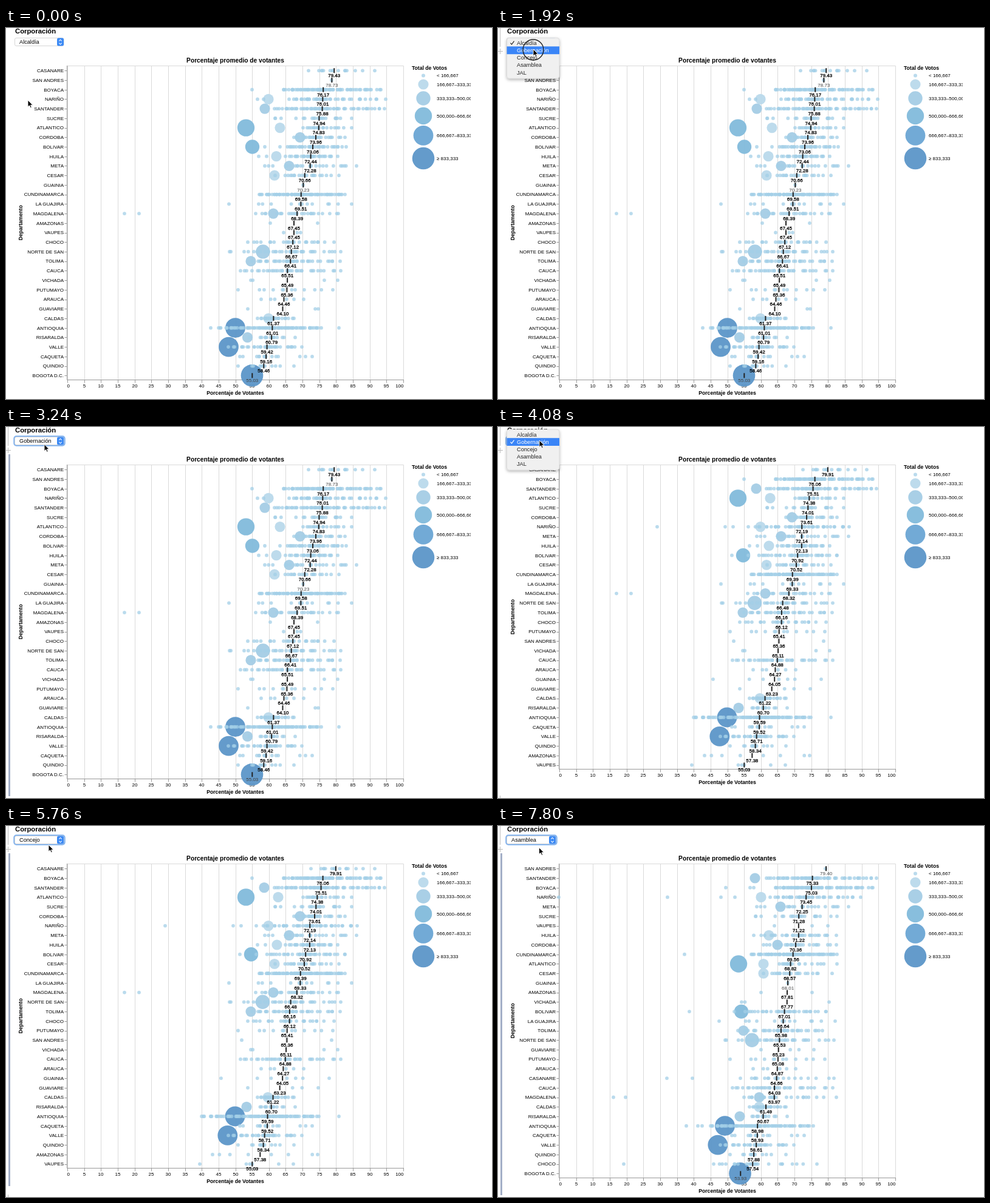
An HTML page that plays this animation: 800 px wide and 612 px high, repeating every 8000 ms.

```html
<!DOCTYPE html>
<html lang="es">
<head>
<meta charset="utf-8">
<title>Porcentaje promedio de votantes</title>
<style>
html, body { margin: 0; width: 100%; height: 100%; overflow: hidden; background: #fff; }
svg { display: block; width: 800px; height: 612px; font: 8px "Liberation Sans", Arial, sans-serif; fill: #000; }
.b { font-weight: bold; font-size: 8.6px; }
.m { text-anchor: middle; }
.e { text-anchor: end; }
.ui { font-size: 9.2px; }
.heavy { stroke: #000; stroke-width: .3px; }
</style>
</head>
<body>
<svg id="stage" viewBox="0 0 800 612"></svg>
<script>
const LOOP = 8000, STEP = 120;
const X0 = 101, UNIT = 5.53, TOP = 62.4, ROW = 15.72;
const COLORS = ['#a3cfe7', '#b9d9eb', '#a4cce5', '#82badb', '#6ba6d4', '#5c96c9'];
const OPTIONS = ['Alcaldía', 'Gobernación', 'Concejo', 'Asamblea', 'JAL'];

// Mean turnout per department for the three views
const MEANS = {
  'CASANARE': [79.43, 79.91, 64.66], 'SAN ANDRES': [78.73, 65.36, 79.40],
  'BOYACA': [76.17, 76.06, 75.03], 'NARIÑO': [76.01, 72.19, 73.45],
  'SANTANDER': [75.88, 75.51, 75.33], 'SUCRE': [74.94, 74.01, 71.28],
  'ATLANTICO': [74.83, 74.38, 68.82], 'CORDOBA': [73.96, 73.61, 70.36],
  'BOLIVAR': [73.06, 70.92, 67.01], 'HUILA': [72.44, 72.13, 71.22],
  'META': [72.28, 72.14, 72.25], 'CESAR': [70.66, 70.52, 68.57],
  'GUAINIA': [70.23, 64.05, 68.01], 'CUNDINAMARCA': [69.58, 69.39, 69.56],
  'LA GUAJIRA': [69.51, 69.33, 66.64], 'MAGDALENA': [68.39, 68.32, 63.97],
  'AMAZONAS': [67.45, 57.38, 67.81], 'VAUPES': [67.45, 55.03, 71.221],
  'CHOCO': [67.12, 66.12, 57.54], 'NORTE DE SAN': [66.67, 66.48, 65.53],
  'TOLIMA': [66.41, 66.16, 65.98], 'CAUCA': [65.51, 64.88, 64.03],
  'VICHADA': [65.49, 65.11, 67.77], 'PUTUMAYO': [65.36, 65.41, 65.08],
  'ARAUCA': [64.46, 64.27, 64.87], 'GUAVIARE': [64.10, 63.23, 65.23],
  'CALDAS': [61.37, 61.22, 61.49], 'ANTIOQUIA': [61.01, 59.59, 58.98],
  'RISARALDA': [60.79, 60.70, 60.67], 'VALLE': [59.42, 58.71, 58.61],
  'CAQUETA': [59.16, 59.52, 58.93], 'QUINDIO': [58.46, 58.34, 57.88],
  'BOGOTA D.C.': [55.03, 0, 53.93]
};

// Town dots: left edge, right edge, count; later views only list differences
const SPREAD = [{
  'CASANARE': [498, 607, 15], 'SAN ANDRES': [536, 536, 1], 'BOYACA': [457, 617, 72],
  'NARIÑO': [466, 625, 42], 'SANTANDER': [442, 623, 62], 'SUCRE': [443, 569, 21],
  'ATLANTICO': [489, 569, 20], 'CORDOBA': [474, 558, 26], 'BOLIVAR': [451, 560, 34],
  'HUILA': [460, 546, 30], 'META': [426, 577, 25], 'CESAR': [443, 548, 21],
  'GUAINIA': [489, 489, 1], 'CUNDINAMARCA': [417, 558, 85], 'LA GUAJIRA': [367, 569, 14],
  'MAGDALENA': [411, 547, 26], 'AMAZONAS': [435, 513, 2], 'VAUPES': [457, 485, 3],
  'CHOCO': [398, 540, 26], 'NORTE DE SAN': [368, 551, 34], 'TOLIMA': [405, 550, 37],
  'CAUCA': [386, 551, 36], 'VICHADA': [403, 546, 4], 'PUTUMAYO': [382, 538, 12],
  'ARAUCA': [420, 490, 6], 'GUAVIARE': [398, 514, 3], 'CALDAS': [414, 474, 23],
  'ANTIOQUIA': [350, 519, 82], 'RISARALDA': [400, 476, 14], 'VALLE': [366, 487, 34],
  'CAQUETA': [385, 504, 15], 'QUINDIO': [382, 474, 12]
}, {
  'CASANARE': [502, 607, 15], 'SAN ANDRES': [388, 536, 2], 'NARIÑO': [412, 578, 45],
  'BOLIVAR': [412, 558, 36], 'GUAINIA': [354, 532, 7], 'AMAZONAS': [340, 513, 8],
  'VAUPES': [319, 473, 6], 'GUAVIARE': [398, 514, 4], 'ANTIOQUIA': [322, 515, 84]
}, {
  'CASANARE': [399, 553, 20], 'SAN ANDRES': [539, 539, 1], 'NARIÑO': [448, 597, 42],
  'SUCRE': [424, 558, 22], 'ATLANTICO': [463, 558, 19], 'CORDOBA': [437, 557, 26],
  'BOLIVAR': [389, 540, 36], 'HUILA': [421, 557, 30], 'CESAR': [437, 550, 22],
  'GUAINIA': [477, 477, 1], 'LA GUAJIRA': [364, 555, 14], 'MAGDALENA': [405, 557, 24],
  'AMAZONAS': [433, 517, 2], 'VAUPES': [455, 543, 3], 'VICHADA': [401, 545, 3],
  'TOLIMA': [395, 534, 36], 'NORTE DE SAN': [374, 553, 33], 'CHOCO': [355, 525, 24],
  'GUAVIARE': [433, 520, 4], 'ANTIOQUIA': [350, 519, 82]
}];

const STRAY = [
  { 'BOYACA': [405], 'NARIÑO': [414, 424], 'BOLIVAR': [426], 'HUILA': [416, 429], 'MAGDALENA': [195, 219], 'ANTIOQUIA': [337, 548] },
  { 'BOYACA': [405], 'NARIÑO': [262, 374, 387], 'BOLIVAR': [385], 'HUILA': [414, 427], 'MAGDALENA': [195, 219], 'ANTIOQUIA': [548] },
  { 'CASANARE': [278, 320], 'BOYACA': [375, 415, 421], 'NARIÑO': [100, 279, 367, 390], 'BOLIVAR': [315],
    'CUNDINAMARCA': [307], 'MAGDALENA': [190, 210], 'CHOCO': [207], 'ANTIOQUIA': [310, 329, 336] }
];

// Cities: department, radius, colour, x in each view
const CITIES = [
  ['NARIÑO', 8.6, 1, 432, 432, 433], ['SANTANDER', 8.6, 2, 426, 425, 423],
  ['ATLANTICO', 14.2, 3, 395, 395, 396], ['ATLANTICO', 8.6, 1, 451, 448, 437],
  ['CORDOBA', 8.6, 2, 484, 484, 460], ['BOLIVAR', 11.7, 3, 405.5, 403.5, 400.5],
  ['HUILA', 8.6, 1, 445, 446, 446], ['META', 8.6, 2, 466, 466, 465],
  ['CESAR', 8.6, 1, 442, 442, 437], ['MAGDALENA', 8.6, 2, 440, 440, 430],
  ['NORTE DE SAN', 11.7, 2, 423, 422.5, 418], ['TOLIMA', 8.6, 2, 403, 403, 404],
  ['CALDAS', 8.6, 1, 432, 431, 430], ['ANTIOQUIA', 16.4, 5, 377.5, 377, 373.5],
  ['RISARALDA', 8.6, 2, 397.5, 396, 398], ['VALLE', 16.4, 5, 366.5, 364.8, 361.8],
  ['BOGOTA D.C.', 18.3, 5, 405, 0, 398.5]
];

const LEGEND = [['< 166,667', 78.5, 3], ['166,667–333,333', 93, 8.6], ['333,333–500,000', 116, 11.7],
  ['500,000–666,667', 145, 14.2], ['666,667–833,333', 177.3, 16.4], ['≥ 833,333', 215, 18.3]];

// Pointer: time, x, y
const PATH = [[0, 36, 119], [120, 36, 119], [240, 40, 100], [480, 40, 100], [960, 54, 21], [1560, 54, 21],
  [1920, 58, 35], [2760, 60, 35], [3000, 60, 35], [3480, 66, 22], [4080, 68, 22], [4440, 70, 35],
  [4800, 70, 31], [5760, 70, 31], [6120, 69, 23], [6480, 69, 23], [6840, 68.5, 33.5], [7800, 67.5, 35.5]];
const OPEN = [[1320, 2160], [3720, 4800], [6360, 7200]];
const CLICKS = [960, 1920, 3480, 4560, 6120, 6960];
const SWAPS = [3360, 6840];

const px = v => X0 + v * UNIT;
const during = (t, [a, b]) => t >= a && t < b;
const text = (x, y, s, cls = '', more = '') => `<text x="${x}" y="${y}" class="${cls}" ${more}>${s}</text>`;
const rect = (x, y, w, h, fill, more = '') => `<rect x="${x}" y="${y}" width="${w}" height="${h}" fill="${fill}" ${more}/>`;
const dot = (x, y, r, c, o) => `<circle cx="${x.toFixed(1)}" cy="${y.toFixed(1)}" r="${r}" fill="${COLORS[c]}" fill-opacity="${o}"/>`;
const path = (d, stroke, w = 1) => `<path d="${d}" fill="none" stroke="${stroke}" stroke-width="${w}"/>`;

function random(seed) {
  return () => (seed = (seed * 16807) % 2147483647) / 2147483647;
}

// Dots crowd around the mean and reach both edges
function towns(name, view, mean, seed) {
  const [lo, hi, n] = SPREAD[view][name] || SPREAD[0][name] || [0, 0, 0];
  const rnd = random(seed * 7919 + 77), mid = Math.min(hi, Math.max(lo, px(mean)));
  const xs = [...(STRAY[view][name] || [])];
  for (let i = 0; i < n; i++) {
    const u = 2 * (i + 3 * rnd() - 1) / n - 1;
    const t = i === 0 ? -1 : i === n - 1 ? 1 : Math.max(-1, Math.min(1, u));
    xs.push(mid + (t < 0 ? lo - mid : hi - mid) * Math.abs(t) ** 1.4);
  }
  return xs;
}

function chart(view) {
  const names = Object.keys(MEANS);
  const rows = names.filter(n => MEANS[n][view]).sort((a, b) => MEANS[b][view] - MEANS[a][view]);
  const bottom = Math.round(TOP + rows.length * ROW) - .5;
  let grid = '', ticks = '', axis = '', small = '', big = '', marks = '';
  for (let v = 0; v <= 100; v += 5) {
    const x = Math.round(px(v)) + .5;
    grid += `M${x} 62.5V${bottom}`;
    ticks += `M${x} ${bottom}v5`;
    axis += text(v === 100 ? 654.5 : v ? x - .5 : 100.5, bottom + 12.3, v, v === 100 ? 'e' : v ? 'm' : '');
  }
  rows.forEach((name, i) => {
    const y = TOP + (i + .5) * ROW, mean = MEANS[name][view], x = px(mean);
    const dots = towns(name, view, mean, names.indexOf(name) + 1);
    ticks += `M96.5 ${Math.round(y)}.5h4`;
    axis += text(95, y + 2.8, name, 'e');
    for (const c of CITIES) if (c[0] === name) big += dot(c[3 + view], y, c[1], c[2], .95);
    for (const tx of dots) small += dot(tx, y, 2.9, 0, .75);
    marks += rect(x - 1, y - 4, 2, 8, '#222') +
      text(x, y + 10.8, mean.toFixed(2), dots.length > 1 ? 'm heavy' : 'm', dots.length > 1 ? '' : 'fill="#444"');
  });
  const mid = (62 + bottom) / 2;
  return `<g class="chart">${path(grid + 'M101 62.5H654.5', '#dadada')}${path(ticks + `M100.5 62V${bottom}H655`, '#999')}` +
    axis + text(377.5, bottom + 24.2, 'Porcentaje de Votantes', 'b m') +
    text(0, 0, 'Departamento', 'b m', `transform="translate(27 ${mid}) rotate(-90)"`) +
    big + small + marks + '</g>';
}

function legend() {
  let s = text(668, 69, 'Total de Votos', 'b');
  LEGEND.forEach(([label, y, r], i) => {
    s += dot(687, y, r, i, i ? .95 : .75) + text(709, y + 2.6, label);
  });
  return `<g clip-path="url(#cut)">${s}</g>`;
}

const stage = document.getElementById('stage');
stage.innerHTML = `<defs><clipPath id="cut"><rect x="660" y="55" width="105" height="190"/></clipPath>
  <filter id="soft" x="-20%" y="-20%" width="140%" height="150%"><feDropShadow dx="0" dy="2" stdDeviation="2.5" flood-opacity=".3"/></filter></defs>` +
  rect(0, 0, 800, 612, '#fff') +
  [0, 1, 2].map(chart).join('') +
  text(377.5, 56.8, 'Porcentaje promedio de votantes', 'b m', 'style="font-size:10.2px"') + legend() +
  `<g id="edge">${path('M3.5 0V31M-1 38.5H8M3.5 34V43', '#bbb')}</g>` +
  `<path id="foot" d="M3.5 608V612" stroke="#bbb"/>` +
  rect(4, 45, 3, 564, '#a3afc7', 'id="bar"') +
  text(15, 8.6, 'Corporación', 'b', 'style="font-size:11.3px"') +
  rect(13.5, 15.5, 83, 15, 'none', 'id="focus" rx="3.5" stroke="#7fb2f0" stroke-width="2.4"') +
  rect(14.5, 16.5, 80.5, 13, '#fff', 'rx="2.5" stroke="#ccc" stroke-width=".8"') +
  rect(84, 16.5, 11, 13, '#3c8af5', 'rx="2.5"') +
  path('M87.3 21.6L89.5 19.2L91.7 21.6M87.3 24.6L89.5 27L91.7 24.6', '#fff', 1.1) +
  text(22, 26.4, '', 'ui', 'id="choice"') +
  rect(17, 602.8, 735, 5.6, '#7e7e7e', 'id="scroll" rx="2.8"') +
  `<g id="menu">${rect(14.5, 4, 86.5, 67, '#f0f0f0', 'rx="4" filter="url(#soft)" stroke="#cfcfcf" stroke-width=".6"')}` +
  rect(14.5, 0, 86.5, 12.8, '#3a85f7', 'id="hover"') +
  OPTIONS.map((o, i) => text(31, 15.6 + i * 12.2, o, 'ui item')).join('') +
  `<path id="check" d="M-3 0L-1 2.4L3-3" fill="none" stroke-width="1.2"/></g>` +
  '<circle id="ring" r="17" fill="none" stroke="#222" stroke-width="1.4"/>' +
  '<path id="arrow" d="M0 0V11.2L2.6 8.8L4.4 12.8L6.2 12L4.5 8.2H8Z" fill="#000" stroke="#fff" stroke-width=".9"/>';

const $ = id => document.getElementById(id);
const charts = [...document.querySelectorAll('.chart')], items = [...document.querySelectorAll('.item')];
const show = (el, on) => el.setAttribute('display', on ? 'inline' : 'none');
const move = (el, x, y) => el.setAttribute('transform', `translate(${x} ${y})`);

function pointer(t) {
  const i = PATH.findIndex(p => p[0] > t);
  if (i < 0) return PATH[PATH.length - 1].slice(1);
  const [a, ax, ay] = PATH[i - 1], [b, bx, by] = PATH[i];
  const u = (t - a) / (b - a), k = u * u * (3 - 2 * u);
  return [ax + (bx - ax) * k, ay + (by - ay) * k];
}

function draw(t) {
  const view = SWAPS.filter(s => t >= s).length;
  const pick = OPEN.filter(o => t >= o[1]).length;
  const open = OPEN.some(o => during(t, o));
  const [x, y] = pointer(t);

  charts.forEach((c, i) => show(c, i === view));
  $('choice').textContent = OPTIONS[pick];
  show($('focus'), pick > 0);
  show($('edge'), t >= 720);
  show($('foot'), view === 1);
  show($('bar'), t >= 2160 && !during(t, [3720, 4920]));
  $('bar').setAttribute('height', view === 1 ? 549 : 564);

  const since = view ? t - SWAPS[view - 1] : LOOP;
  show($('scroll'), since < 480);
  $('scroll').setAttribute('y', view === 1 ? 586.8 : 602.8);
  $('scroll').setAttribute('opacity', since < 360 ? 1 : .5);

  show($('menu'), open);
  if (open) {
    const hot = Math.max(0, Math.min(4, pick + Math.round((y - 24.5) / 12.2)));
    move($('menu'), 0, (1 - pick) * 12.2);
    $('hover').setAttribute('y', 6 + hot * 12.2);
    items.forEach((el, i) => el.setAttribute('fill', i === hot ? '#fff' : '#222'));
    move($('check'), 23.5, 12.5 + pick * 12.2);
    $('check').setAttribute('stroke', pick === hot ? '#fff' : '#222');
  }
  show($('ring'), CLICKS.some(c => during(t, [c, c + 240])));
  move($('ring'), x, y + 1);
  move($('arrow'), x, y);
}

const start = performance.now();
function tick(now) {
  const t = Math.max(0, now - start) % LOOP;
  draw(Math.floor(t / STEP) * STEP);
  requestAnimationFrame(tick);
}
draw(0);
requestAnimationFrame(tick);
</script>
</body>
</html>
```
